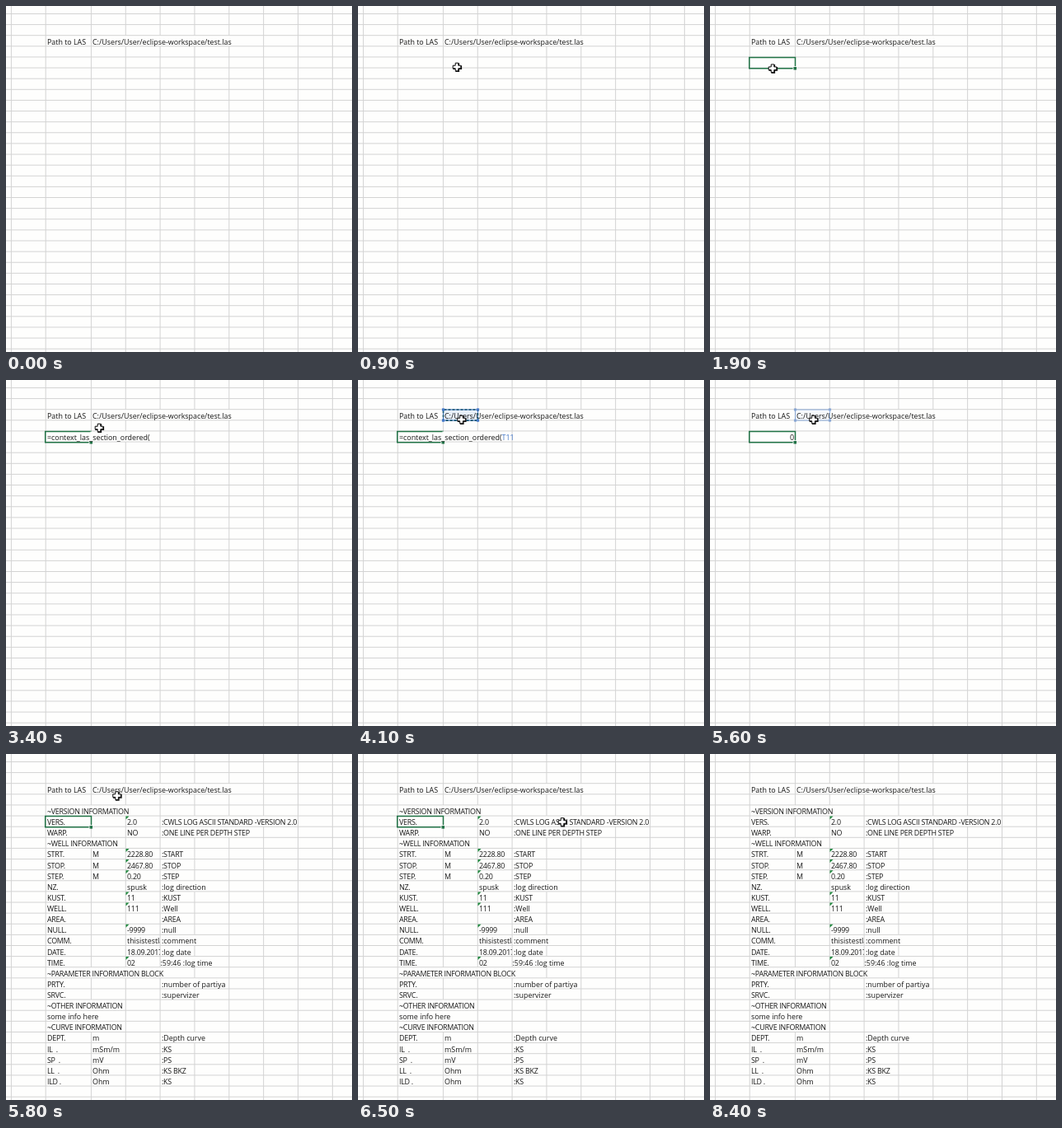
Animation of 420 by 420 pixels, one loop 8.5 s. Source, as an HTML page:

```html
<!DOCTYPE html>
<html lang="en">
<head>
<meta charset="utf-8">
<title>LAS sheet</title>
<style>
html, body { margin: 0; width: 100%; height: 100%; overflow: hidden; background: #fefefd; }
svg { display: block; width: 420px; height: 420px; }
text { font-family: 'Open Sans', 'Noto Sans', sans-serif; font-size: 8.9px; fill: #161616; white-space: pre; }
.tight { letter-spacing: -0.25px; }
</style>
</head>
<body>
<svg id="stage" viewBox="0 0 420 420"></svg>
<script>
const NS = 'http://www.w3.org/2000/svg';
const LOOP = 8500, STEP = 100, PITCH = 13.12;
const PAPER = '#fefefd', GRID = '#d3d3d3', GREEN = '#217346', BLUE = '#4478c8';
const COLS = [6.4, 48.2];
for (let i = 0; i < 8; i++) COLS.push(103.4 + 41.85 * i);
const TEXT_X = [50, 105, 147, 189];
const stage = document.getElementById('stage');

// Each row: name, unit, value, description; a leading ^ marks a number stored as text
const ROWS = [
  ['~VERSION INFORMATION'],
  ['VERS.', '', '^2.0', ':CWLS LOG ASCII STANDARD -VERSION 2.0'],
  ['WARP.', '', 'NO', ':ONE LINE PER DEPTH STEP'],
  ['~WELL INFORMATION'],
  ['STRT.', 'M', '^2228.80', ':START'],
  ['STOP.', 'M', '^2467.80', ':STOP'],
  ['STEP.', 'M', '^0.20', ':STEP'],
  ['NZ.', '', 'spusk', ':log direction'],
  ['KUST.', '', '^11', ':KUST'],
  ['WELL.', '', '^111', ':Well'],
  ['AREA.', '', '', ':AREA'],
  ['NULL.', '', '^-9999', ':null'],
  ['COMM.', '', 'thisistestlas', ':comment'],
  ['DATE.', '', '18.09.2017', ':log date'],
  ['TIME.', '', '^02', ':59:46 :log time'],
  ['~PARAMETER INFORMATION BLOCK'],
  ['PRTY.', '', '', ':number of partiya'],
  ['SRVC.', '', '', ':supervizer'],
  ['~OTHER INFORMATION'],
  ['some info here'],
  ['~CURVE INFORMATION'],
  ['DEPT.', 'm', '', ':Depth curve'],
  ['IL  .', 'mSm/m', '', ':KS'],
  ['SP  .', 'mV', '', ':PS'],
  ['LL  .', 'Ohm', '', ':KS BKZ'],
  ['ILD .', 'Ohm', '', ':KS']
];

function add(tag, attrs, parent = stage, content) {
  const el = document.createElementNS(NS, tag);
  for (const k in attrs) el.setAttribute(k, attrs[k]);
  if (content !== undefined) el.textContent = content;
  parent.appendChild(el);
  return el;
}

const rowTop = r => 35.7 + PITCH * r;
const baseline = r => rowTop(r) + 11;
const show = (el, on) => el.setAttribute('visibility', on ? 'visible' : 'hidden');

// Blank the column lines that overflowing text runs across
function coverLines(x, end, r, parent) {
  for (const c of COLS) {
    if (c > x && c < end) {
      add('rect', { x: c - 1, y: rowTop(r) + 0.5, width: 2, height: PITCH - 1, fill: PAPER }, parent);
    }
  }
}

function cell(str, x, r, parent, clip) {
  const el = add('text', { x, y: baseline(r) }, parent, str);
  if (!/[a-z]/.test(str)) el.setAttribute('class', 'tight');
  if (clip) el.setAttribute('clip-path', 'url(#valueCol)');
  else coverLines(x, x + el.getComputedTextLength(), r, parent);
  parent.appendChild(el);
}

const defs = add('defs', {});
add('rect', { x: 145, y: 0, width: 42, height: 420 }, add('clipPath', { id: 'valueCol' }, defs));

let grid = '';
for (const x of COLS) grid += `M${x} 0V420`;
for (let r = -2; r < 30; r++) grid += `M0 ${rowTop(r)}H420`;
add('path', { d: grid, stroke: GRID, 'stroke-width': 1, fill: 'none' });

const head = add('g', {});
cell('Path to LAS', 50, 0, head);
const pick = add('g', {});
const pickFill = add('rect', { x: 103.4, y: 36, width: 42, height: 13.1, fill: '#e8f0fa' }, pick);
cell('C:/Users/User/eclipse-workspace/test.las', 105, 0, head);
stage.insertBefore(pick, head);

const data = add('g', {});
ROWS.forEach((row, i) => row.forEach((str, c) => {
  if (!str) return;
  const r = i + 2, flagged = str[0] === '^';
  const x = str.startsWith(':59') ? 187.5 : TEXT_X[c];
  cell(flagged ? str.slice(1) : str, x, r, data, c === 2);
  if (flagged) {
    add('path', { d: `M145.5 ${rowTop(r) + 0.5}h4l-4 4z`, fill: '#21883f' }, data);
  }
}));

// Cell selection: full frame with handle, or an open frame while editing
const select = add('g', {});
const border = { fill: 'none', stroke: GREEN, 'stroke-width': 1.5 };
const closed = add('path', { d: 'M100.5 75.7H47.7V62.5H103.5V73', ...border }, select);
const open = add('path', { d: 'M104 62.5H47.7V75.7H100.5', ...border }, select);
add('rect', { x: 101.5, y: 74, width: 3.5, height: 3.5, fill: GREEN }, select);

const edit = add('g', {});
const FORMULA = '=context_las_section_ordered(';
const editCover = add('g', {}, edit);
coverLines(50, 178, 2, editCover);
const line = add('text', { x: 50, y: baseline(2) }, edit);
const typed = add('tspan', {}, line);
const ref = add('tspan', { fill: BLUE }, line);
const tail = add('tspan', {}, line);

const zero = add('text', { x: 102, y: baseline(2), 'text-anchor': 'end' }, stage, '0');

const frame = add('g', {});
const box = { x: 103.5, y: 36, width: 42, height: 13.1, fill: 'none' };
add('rect', { ...box, stroke: BLUE }, frame);
const ants = add('rect', {
  ...box, stroke: '#17566f', 'stroke-width': 1.6, 'stroke-dasharray': '3 2'
}, frame);
for (const x of [103.5, 145.5]) for (const y of [36, 49.1]) {
  add('rect', { x: x - 1.6, y: y - 1.6, width: 3.2, height: 3.2, fill: BLUE }, frame);
}

const mouse = add('g', {});
const CROSS = 'M-1.8 -4.8h3.6v3h3v3.6h-3v3h-3.6v-3h-3v-3.6h3z';
add('path', { d: CROSS, fill: '#111', stroke: '#111', 'stroke-width': 1.2, transform: 'translate(.7 .7)' }, mouse);
add('path', { d: CROSS, fill: '#fff', stroke: '#111', 'stroke-width': 1 }, mouse);

// time, x, y
const PATH = [
  [100, 400, 324], [900, 120, 74], [1500, 76, 75.7], [2000, 76, 75.7],
  [2300, 80, 81], [2800, 84, 81], [3400, 113, 58], [3700, 125.5, 48],
  [5700, 125.5, 48], [6300, 248, 82.5], [6500, 248, 82.5], [6800, 254, 243]
];

function mouseAt(t) {
  let i = 0;
  while (i < PATH.length - 2 && t > PATH[i + 1][0]) i++;
  const [t0, x0, y0] = PATH[i], [t1, x1, y1] = PATH[i + 1];
  const p = Math.min(1, Math.max(0, (t - t0) / (t1 - t0)));
  const e = p * p * (3 - 2 * p);
  return [x0 + (x1 - x0) * e, y0 + (y1 - y0) * e];
}

function draw(time) {
  const t = Math.floor((time % LOOP) / STEP) * STEP;
  const editing = t >= 2000 && t < 5500;
  const filled = t >= 5800;
  const picking = t >= 3800 && t < 5700;

  show(select, t >= 1500 && t < 8100);
  select.setAttribute('transform', `translate(0 ${filled ? PITCH : 0})`);
  closed.style.display = editing ? 'none' : '';
  open.style.display = editing ? '' : 'none';

  const count = Math.round(FORMULA.length * Math.min(1, Math.max(0, (t - 1900) / 800)));
  show(edit, editing);
  typed.textContent = FORMULA.slice(0, count);
  ref.textContent = t >= 3800 ? 'T11' : '';
  tail.textContent = t >= 5200 ? ')' : '';
  editCover.style.display = count > 12 ? '' : 'none';

  show(zero, t >= 5500 && !filled);
  show(data, filled);

  pick.style.display = frame.style.display = picking ? '' : 'none';
  pickFill.setAttribute('opacity', t < 5500 ? 1 : 0.4);
  frame.setAttribute('opacity', t < 5500 ? 1 : 0.55);
  ants.style.display = t < 5200 ? '' : 'none';
  ants.setAttribute('stroke-dashoffset', -(t / 100) % 5);

  const [x, y] = mouseAt(t);
  show(mouse, t >= 100 && t < 6900);
  mouse.setAttribute('transform', `translate(${x.toFixed(2)} ${y.toFixed(2)})`);
}

const start = performance.now();
function tick() {
  draw(performance.now() - start);
  requestAnimationFrame(tick);
}
tick();
</script>
</body>
</html>
```
